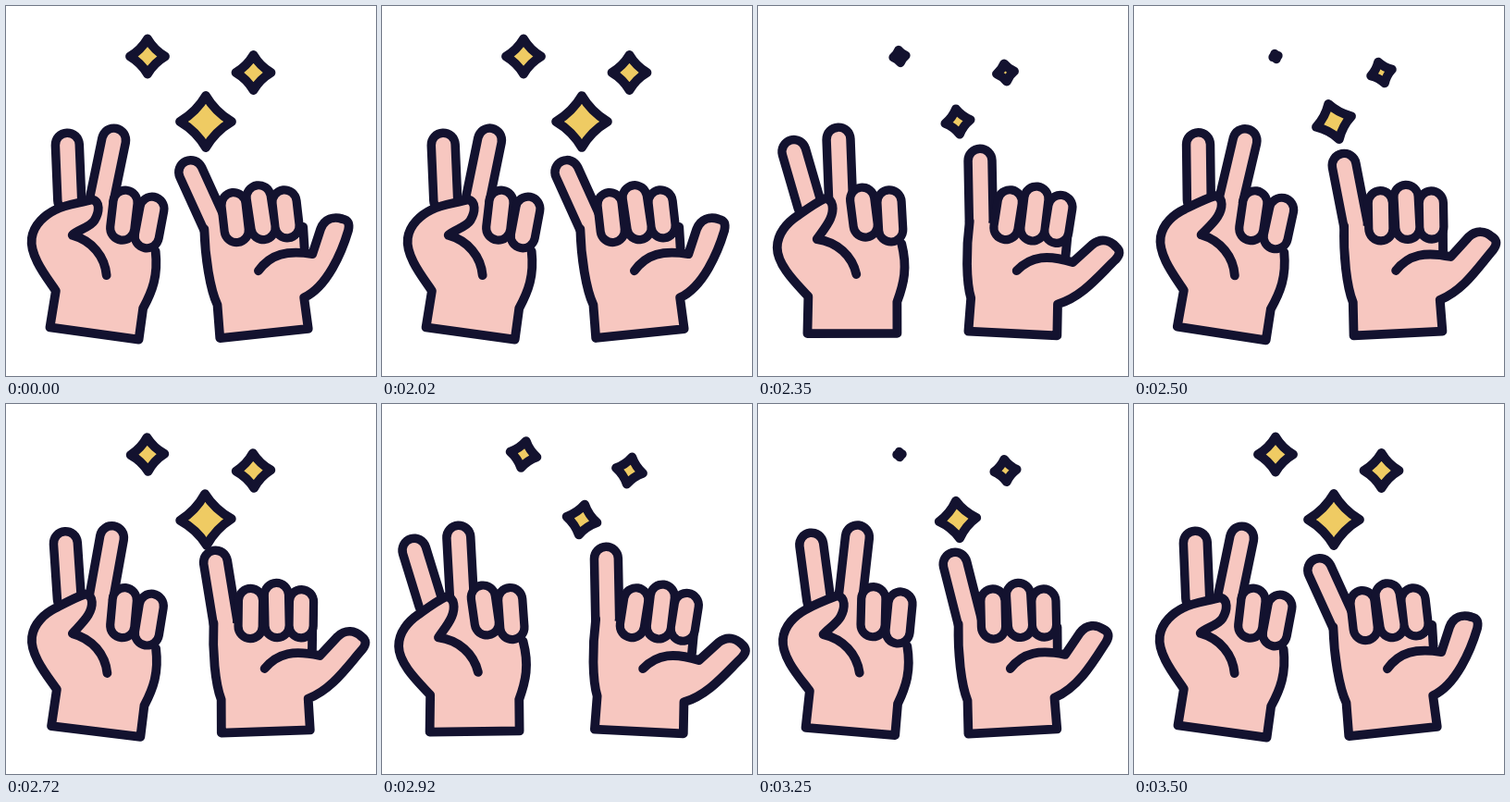
An HTML page for the animation above (3520 ms loop, 400 px wide and 400 px high).

```html
<!DOCTYPE html>
<html>
<head>
<meta charset="utf-8">
<style>
html, body { margin: 0; width: 100%; height: 100%; overflow: hidden; background: #fff; }
svg { display: block; width: 100%; height: 100%; }
path { stroke-linecap: round; stroke-linejoin: round; }
</style>
</head>
<body>
<svg id="stage" viewBox="0 0 400 400"></svg>
<script>
const INK = '#13122f', SKIN = '#f7c7c0', GOLD = '#efcb63';
const LINE = 9.8, TUBE = 35.4, CORE = 16.4;
const LOOP = 3520, REST = 2010, PULSE = 740;

const stage = document.getElementById('stage');
function add(parent, tag, attrs = {}) {
  const el = document.createElementNS('http://www.w3.org/2000/svg', tag);
  for (const k in attrs) el.setAttribute(k, attrs[k]);
  return parent.appendChild(el);
}
const stroke = (g, color, width) =>
  add(g, 'path', { fill: 'none', stroke: color, 'stroke-width': width });

const sin = deg => Math.sin(deg * Math.PI / 180);
const cos = deg => Math.cos(deg * Math.PI / 180);
const smooth = u => {
  u = Math.min(1, Math.max(0, u));
  return u * u * (3 - 2 * u);
};

// Eased swing from one [time, value] stop to the next
function swing(t, ...stops) {
  let v = stops[0][1];
  for (let i = 1; i < stops.length; i++) {
    const [t0, v0] = stops[i - 1], [t1, v1] = stops[i];
    v += (v1 - v0) * smooth((t - t0) / (t1 - t0));
  }
  return v;
}

// Hands are drawn around the middle of the wrist.
// A finger is [base x, base y, length, resting angle].
const leftHand = {
  raised: [[-46, -139, 60, -16], [-12, -142, 68, -2]],
  folded: [[14.5, -117, 28, -7], [42, -112, 30, -3]],
  shift: 0, spread: 0,
  shape(open) {
    // Only the thumb tip slides between the two grips
    const p = (x, y) => `${x + 7 * open} ${y + 3 * open} `;
    const body = 'M53.5-97C60-71 56-54 48.5-34L48.5 0-48.5 0-47.5-40'
      + 'C-58-52-81-73-81-93C-81-108-70-120-59.5-127'
      + `C-49.5-134 ${p(-40, -141)}${p(-29.5, -146)}`
      + `C${p(-19.5, -146)}${p(-19.5, -133)}${p(-23.5, -124)}`;
    return {
      edge: body + `C${p(-27, -116)}-34-108-38-102C-16-99 0-84 4.5-64`,
      fill: body + 'L-12-142 12-143 41-140 42-112Z'
    };
  }
};
const rightHand = {
  raised: [[-40, -120, 65, -6]],
  folded: [[-13, -114, 28, 4], [16, -114, 33, 2], [42, -113, 26, 4]],
  shift: -5, spread: -8,
  shape(open) {
    // The thumb turns about its root
    const c = cos(21 * open), s = sin(21 * open);
    const p = (x, y) => `${61 + x * c + y * s} ${-80 + y * c - x * s} `;
    const outline = `L${p(20, -20)}C${p(29, -28)}${p(39, -26)}${p(46, -19)}`
      + `C${p(51, -15)}${p(51, -11)}${p(46, -5)}`
      + `C${p(29, 13)}73-43 47-34L48 0-48 0-47-36C-53-53-55-88-52.5-119`;
    return {
      edge: 'M1-68C16-85 34-87 61-80' + outline + 'M54-110L53-87',
      fill: 'M61-80' + outline + 'L-40-120-13-114 16-114 42-113 53-87Z'
    };
  }
};

function makeHand(def) {
  const g = add(stage, 'g');
  const fingers = [];
  const tube = (finger, shift, spread) => ({ finger, shift, spread });
  for (const f of def.raised) {
    const part = tube(f, 0, def.spread);
    part.ink = stroke(g, INK, TUBE);
    part.core = stroke(g, SKIN, CORE);
    fingers.push(part);
  }
  const fill = add(g, 'path', { fill: SKIN });
  // The last raised finger runs into the palm without a seam
  g.appendChild(fingers[fingers.length - 1].core);
  const edge = stroke(g, INK, LINE);
  const folded = def.folded.map(f => tube(f, def.shift, 0));
  for (const part of folded) part.ink = stroke(g, INK, TUBE);
  for (const part of folded) part.core = stroke(g, SKIN, CORE + 0.6);
  fingers.push(...folded);

  return (x, rot, open) => {
    g.setAttribute('transform', `translate(${x} 354) rotate(${rot})`);
    const shape = def.shape(open);
    edge.setAttribute('d', shape.edge);
    fill.setAttribute('d', shape.fill);
    for (const { finger: [bx, by, len, rest], shift, spread, ink, core } of fingers) {
      const a = rest + spread * open + 0.75 * rot;
      const x0 = bx + shift * open;
      const d = `M${x0} ${by}L${x0 + len * sin(a)} ${by - len * cos(a)}`;
      ink.setAttribute('d', d);
      core.setAttribute('d', d);
    }
  };
}

// Shrinks to `low` at phase `turn` of each pulse, then grows back
function makeStar(x, y, size, turn, low) {
  const el = add(stage, 'path', { fill: GOLD, stroke: INK, 'stroke-width': LINE });
  return (phase, spin) => {
    const dip = smooth(phase < turn ? phase / turn : (1 - phase) / (1 - turn));
    const r = size * (1 - (1 - low) * dip), k = r * 0.37;
    el.setAttribute('d', `M0 ${-r}Q${k} ${-k} ${r} 0Q${k} ${k} 0 ${r}Q${-k} ${k} ${-r} 0Q${-k} ${-k} 0 ${-r}Z`);
    el.setAttribute('transform', `translate(${x} ${y}) rotate(${spin})`);
  };
}

const stars = [
  makeStar(216, 125, 28, 0.35, 0.45),
  makeStar(153, 54.5, 19, 0.68, 0.15),
  makeStar(267.5, 72, 19, 0.5, 0.5)
];
const left = makeHand(leftHand), right = makeHand(rightHand);

function render(time) {
  const t = Math.max(0, time - REST);
  const open = 1 - smooth(t / 190) + smooth((t - 1080) / 390);
  const tiltL = swing(t, [0, 7.8], [270, -2], [560, 10.5], [980, -1.5], [1400, 7.8]);
  const tiltR = swing(t, [0, -6], [270, 4], [560, -4], [980, 3.3], [1400, -6]);
  const slideL = swing(t, [190, 0], [340, -9], [490, 1], [750, 0], [1075, -24], [1270, 0]);
  const slideR = swing(t, [190, -1], [340, 13], [750, 9], [1075, 22], [1270, 0]);
  // Each hand tips about its middle, so the wrist swings the other way
  left(110.7 - 112 * sin(tiltL) + slideL, tiltL, open);
  right(268 - 115 * sin(tiltR) + slideR, tiltR, open);

  const phase = t < 2 * PULSE ? t / PULSE % 1 : 0;
  const spin = swing(t, [190, 0], [490, -17], [910, 11], [1240, -6], [1480, 0]);
  for (const star of stars) star(phase, spin);
}

const start = performance.now();
function tick() {
  render((performance.now() - start) % LOOP);
  requestAnimationFrame(tick);
}
tick();
</script>
</body>
</html>
```
